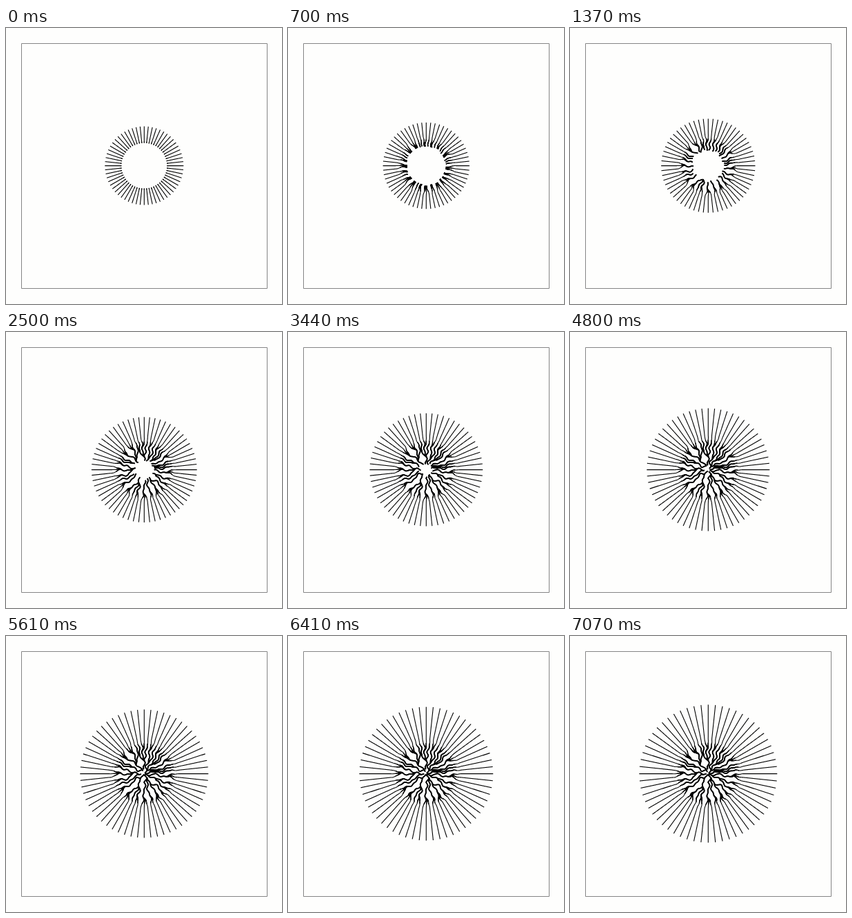
These frames come from a looping animation (400 by 400 pixels, 7130 ms). An HTML page with a canvas:

```html
<!DOCTYPE html>
<html lang="en">
<head>
<meta charset="utf-8">
<title>Radial growth</title>
<style>
  html, body { margin: 0; width: 100%; height: 100%; overflow: hidden; background: #fefefd; }
  canvas { display: block; width: 400px; height: 400px; }
</style>
</head>
<body>
<canvas id="stage" width="400" height="400"></canvas>
<script>
const ctx = document.getElementById('stage').getContext('2d');
const LOOP = 7130, STEP = 100 / 3, SPOKES = 60;
const CX = 200.3, CY = 199.6, TAU = Math.PI * 2;

// [ms, radius] of the outer and inner ends of the spokes
const OUTER = [[0, 57], [1370, 68.2], [2500, 76.4], [3440, 82], [4800, 89], [6410, 97], [7070, 100]];
const INNER = [[0, 33], [700, 28.5], [1370, 23], [2500, 14.5], [3440, 9.5], [4800, 4], [6410, 1.5], [7070, 1]];

let seed = 41;
function rand() {
  seed = (seed + 0x6D2B79F5) | 0;
  let n = Math.imul(seed ^ (seed >>> 15), 1 | seed);
  n ^= n + Math.imul(n ^ (n >>> 7), 61 | n);
  return ((n ^ (n >>> 14)) >>> 0) / 4294967296;
}

const mix = (a, b, k) => a + (b - a) * k;
function smooth(from, to, v) {
  const k = Math.min(1, Math.max(0, (v - from) / (to - from)));
  return k * k * (3 - 2 * k);
}
function along(table, t) {
  for (let i = 1; i < table.length; i++) {
    const [t0, a] = table[i - 1], [t1, b] = table[i];
    if (t <= t1) return mix(a, b, (t - t0) / (t1 - t0));
  }
  return table[table.length - 1][1];
}

// Splits a list into neighbouring runs of random length.
function runs(list, min, max) {
  const out = [];
  for (let i = 0; i < list.length;) {
    const n = min + Math.floor(rand() * (max - min + 1));
    out.push(list.slice(i, i + n));
    i += n;
  }
  return out;
}
const mean = group => group.reduce((sum, s) => sum + s.angle, 0) / group.length;

const spokes = Array.from({ length: SPOKES }, (_, i) => ({ angle: i * TAU / SPOKES }));

// Spokes join into strands, strands into branches, branches into a few arms.
const strands = runs(spokes, 1, 3);
for (const strand of strands) {
  const mid = mean(strand), join = 28 + rand() * 5, lag = (rand() - 0.5) * 6;
  for (const s of strand) Object.assign(s, { strand: mid, join1: join, lag, stop: 0 });
}
const branches = runs(strands, 1, 3);
for (const branch of branches) {
  const mid = mean(branch.flat()), join = 13 + rand() * 5;
  branch.forEach((strand, i) => {
    const stop = i && rand() < 0.6 ? join + 2 + rand() * 4 : 0;
    for (const s of strand) Object.assign(s, { branch: mid, join2: join, stop });
  });
}
for (const arm of runs(branches, 2, 3)) {
  const mid = mean(arm.flat(2)), join = 4 + rand() * 3;
  arm.forEach((branch, i) => {
    const stop = i && rand() < 0.5 ? join + 2 : 0;
    for (const s of branch.flat()) {
      s.arm = mid;
      s.join3 = join;
      s.stop = Math.max(s.stop, stop);
    }
  });
}

// Sideways bend in pixels, shared by neighbours so that they run side by side.
function bend(a, r) {
  return 0.75 * Math.sin(0.58 * r + 2 * Math.sin(3 * a) + 2 * a)
       + 1.5 * Math.sin(0.25 * r + 1.5 * Math.sin(2 * a + 1) - 3 * a);
}

function point(s, r, grow, edge) {
  let a = mix(s.angle, s.strand, grow * (1 - smooth(s.join1, edge + 2, r)));
  a = mix(a, s.branch, 1 - smooth(s.join2, s.join2 + 11, r));
  a = mix(a, s.arm, 1 - smooth(s.join3, s.join3 + 7, r));
  const env = grow * (1 - smooth(edge - 16, edge + 6, r));
  a += env * bend(a, r) / Math.max(r, 8);
  return [CX + r * Math.cos(a), CY + r * Math.sin(a)];
}

function trace(s, from, to, grow, edge) {
  if (from <= to) return;
  ctx.moveTo(...point(s, from, grow, edge));
  for (let r = from - 0.8; r > to; r -= 0.8) ctx.lineTo(...point(s, r, grow, edge));
  ctx.lineTo(...point(s, to, grow, edge));
}

function draw(t) {
  const outer = along(OUTER, t), inner = along(INNER, t);
  const grow = smooth(0, 1300, t);
  const edge = 38 + 10 * Math.sqrt(t / 7070);

  ctx.fillStyle = '#fefefd';
  ctx.fillRect(0, 0, 400, 400);
  ctx.lineWidth = 1;
  ctx.strokeStyle = '#858585';
  ctx.strokeRect(22.5, 22.5, 356, 355);

  ctx.strokeStyle = '#000';
  ctx.lineJoin = 'round';
  const pass = (width, from) => {
    ctx.lineWidth = width;
    ctx.beginPath();
    for (const s of spokes) {
      const tip = Math.max(inner + s.lag * grow * 0.7, s.stop, 0.8);
      trace(s, from, tip, grow, edge);
    }
    ctx.stroke();
  };
  pass(1.1, outer);
  pass(1.1 + 0.3 * grow, edge - 3);
  pass(1.1 + 0.7 * grow, edge - 7);
}

function tick(now) {
  const t = now % LOOP;
  draw(Math.min(212, Math.floor(t / STEP + 0.1)) * STEP);
  requestAnimationFrame(tick);
}
draw(0);
requestAnimationFrame(tick);
</script>
</body>
</html>
```
